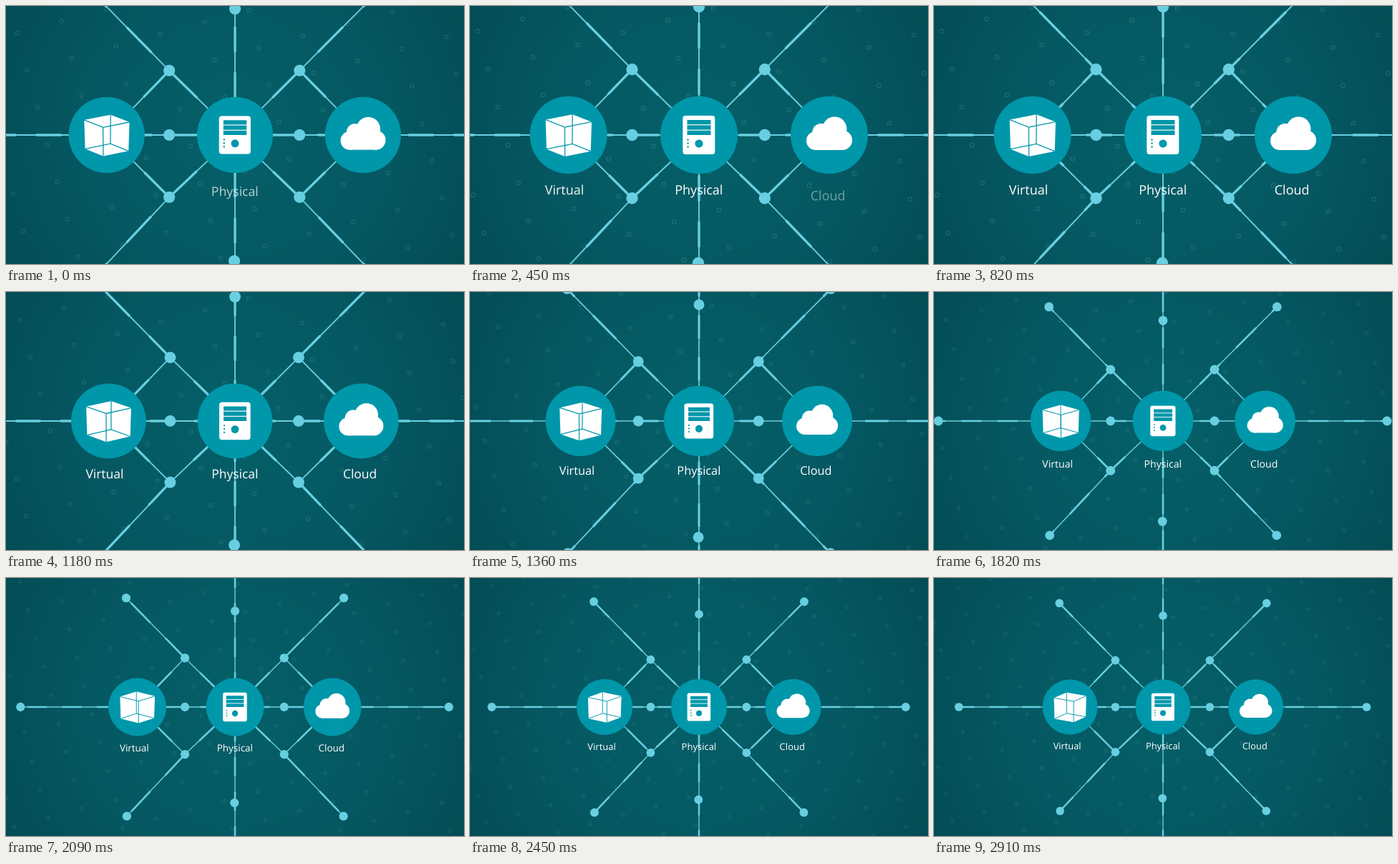
An HTML page that plays this animation: 640x360 px, repeating every 3 s.

```html
<!DOCTYPE html>
<html lang="en">
<head>
<meta charset="utf-8">
<title>Virtual, Physical, Cloud</title>
<style>
  html, body { margin: 0; width: 100%; height: 100%; overflow: hidden; background: #045660; }
  svg { display: block; width: 100vw; height: 100vh; }
  .line { fill: none; stroke: #68cfe1; stroke-width: 1.9; }
  .pulse { fill: none; stroke: #68cfe1; stroke-width: 3.4; }
  .node { fill: #68cfe1; }
  .disc, .detail { fill: #0097aa; }
  .icon { fill: #fff; }
  .edge { fill: none; stroke: #0097aa; stroke-width: 1.3; }
  text { font: 18px "Open Sans", "Noto Sans", sans-serif; fill: #fff; text-anchor: middle; text-rendering: geometricPrecision; }
</style>
</head>
<body>
<svg viewBox="0 0 640 360">
  <defs>
    <radialGradient id="glow" gradientUnits="userSpaceOnUse" cx="320" cy="180" r="370">
      <stop offset="0" stop-color="#055f68"/>
      <stop offset=".55" stop-color="#055862"/>
      <stop offset="1" stop-color="#034c55"/>
    </radialGradient>
    <pattern id="rings" width="65.25" height="54.8" patternUnits="userSpaceOnUse"
             patternTransform="translate(-35.1 -110.5) rotate(-15.1)">
      <circle cx="5" cy="5" r="2.8" fill="none" stroke="#7fd0d4" stroke-opacity=".22"/>
    </pattern>
  </defs>
  <rect width="640" height="360" fill="url(#glow)"/>
  <g id="scene">
    <rect x="-480" y="-280" width="960" height="560" fill="url(#rings)"/>
    <g id="web"></g>
    <circle class="disc" cx="-182.4" r="54"/>
    <circle class="disc" r="54"/>
    <circle class="disc" cx="182" r="54"/>

    <g transform="translate(-182.2 .7)">
      <path id="hull" class="icon"/>
      <path id="edges" class="edge"/>
    </g>

    <rect class="icon" x="-22.7" y="-27" width="45" height="54" rx="4"/>
    <g class="detail">
      <rect x="-16.5" y="-21" width="33" height="6.2"/>
      <rect x="-16.5" y="-13.6" width="33" height="6.2"/>
      <rect x="-16.5" y="-6.2" width="33" height="6.2"/>
      <circle cx="0" cy="12" r="5.6"/>
      <circle cx="-15.5" cy="6.5" r="1.2"/>
      <circle cx="-15.5" cy="11.5" r="1.2"/>
      <circle cx="-15.5" cy="16.5" r="1.2"/>
    </g>

    <g class="icon" transform="translate(182)">
      <circle cx="-19" cy="8" r="13"/>
      <circle cx="18.3" cy="7.2" r="13.8"/>
      <circle cx="7.5" cy="-8.5" r="17"/>
      <circle cx="-11.5" cy="-4" r="12"/>
      <rect x="-19" y="-2" width="38" height="23"/>
    </g>

    <text id="physical" x="-.2" y="82.5">Physical</text>
    <text id="virtual" x="-188" y="82.5">Virtual</text>
    <text id="cloud" x="180.2" y="82.5">Cloud</text>
  </g>
</svg>
<script>
const LOOP = 3000, STEPS = 33;
const $ = id => document.getElementById(id);

function add(tag, attrs) {
  const el = document.createElementNS("http://www.w3.org/2000/svg", tag);
  for (const key in attrs) el.setAttribute(key, attrs[key]);
  $("web").append(el);
  return el;
}

// Paths start at a disc, so all pulses run towards one.
const inner = [[-93.5, -91.5], [91.8, -91.5], [-93.5, 88.3], [91.8, 88.3]];
const outer = [[-203.3, -203.3], [203.3, -203.3], [-202, 203.6], [202.6, 203.6]];
const ends = [[-400.5, 0], [399.4, 0], [0, -270], [0, 270]];
const straight = ends.map(p => [[0, 0], p]);
const slanted = inner.flatMap((p, i) => [
  [[0, 0], p, outer[i]],
  [[Math.sign(p[0]) * 182, 0], p]
]);
const toPath = points => "M" + points.join("L");
[...straight, ...slanted].forEach(p => add("path", { class: "line", d: toPath(p) }));

// Slanted pulses keep pace sideways with the straight ones.
function addPulse(points, stretch) {
  const el = add("path", {
    class: "pulse", d: toPath(points),
    "stroke-dasharray": [36 * stretch, 28.5 * stretch]
  });
  return { el, stretch };
}
const pulses = [
  ...straight.map(p => addPulse(p, 1)),
  ...slanted.map(p => addPulse(p, Math.SQRT2))
];

const nodes = [...inner, ...outer, ends[0], ends[1], [-93.5, 0], [91.8, 0], [0, -179], [-1, 178.8]];
nodes.forEach(([cx, cy]) => add("circle", { class: "node", cx, cy, r: 8.2 }));

const clamp = x => Math.min(1, Math.max(0, x));
const easeOut = x => 1 - (1 - clamp(x)) ** 3;

// Cubic bezier with end heights 0 and 1, solved by bisection.
function bezier(x, a, b) {
  let lo = 0, hi = 1;
  for (let i = 0; i < 24; i++) {
    const u = (lo + hi) / 2, v = 1 - u;
    if (3 * v * v * u * a + 3 * v * u * u * b + u ** 3 < x) lo = u; else hi = u;
  }
  return 3 * (1 - lo) * lo * lo + lo ** 3;
}

function zoom(t) {
  if (t < 900) return 1 - 0.017 * (1 - clamp(t / 450)) ** 2;
  return 1 - 0.288 * bezier((t - 900) / 2100, 0.283, 0.157);
}

function drawCube(yaw) {
  const R = 32.6, tilt = 9, half = 20.5;
  const corner = (k, side) => {
    const a = yaw + k * Math.PI / 2;
    const width = side < 0 ? R : R * 0.96;
    return [width * Math.sin(a), tilt * Math.cos(a) + side * half].map(n => n.toFixed(2));
  };
  const [front, right, back, left] = [0, 1, 2, 3].map(k => ({ top: corner(k, -1), low: corner(k, 1) }));
  $("hull").setAttribute("d", toPath([left.top, back.top, right.top, right.low, front.low, left.low]) + "Z");
  $("edges").setAttribute("d",
    toPath([left.top, front.top, right.top]) + toPath([front.top, front.low]) +
    toPath([left.low, back.low, right.low]) + toPath([back.top, back.low]));
}

function reveal(id, start, t) {
  const shown = easeOut((t - start) / 500);
  $(id).setAttribute("opacity", shown);
  $(id).setAttribute("transform", `translate(0 ${15 * (1 - shown)})`);
}

function render(now) {
  const step = Math.min(STEPS - 1, Math.floor((now % LOOP + 5) * STEPS / LOOP));
  const t = step * LOOP / STEPS;
  $("scene").setAttribute("transform", `translate(320 180) scale(${zoom(t)})`);
  pulses.forEach(({ el, stretch }) => el.setAttribute("stroke-dashoffset", (0.135 * t - 53) * stretch));
  drawCube((-9.5 + 23 * clamp((t - 900) / 2100)) * Math.PI / 180);
  reveal("physical", -170, t);
  reveal("virtual", 150, t);
  reveal("cloud", 370, t);
}

const began = performance.now();
function tick() {
  render(performance.now() - began);
  requestAnimationFrame(tick);
}
tick();
</script>
</body>
</html>
```
